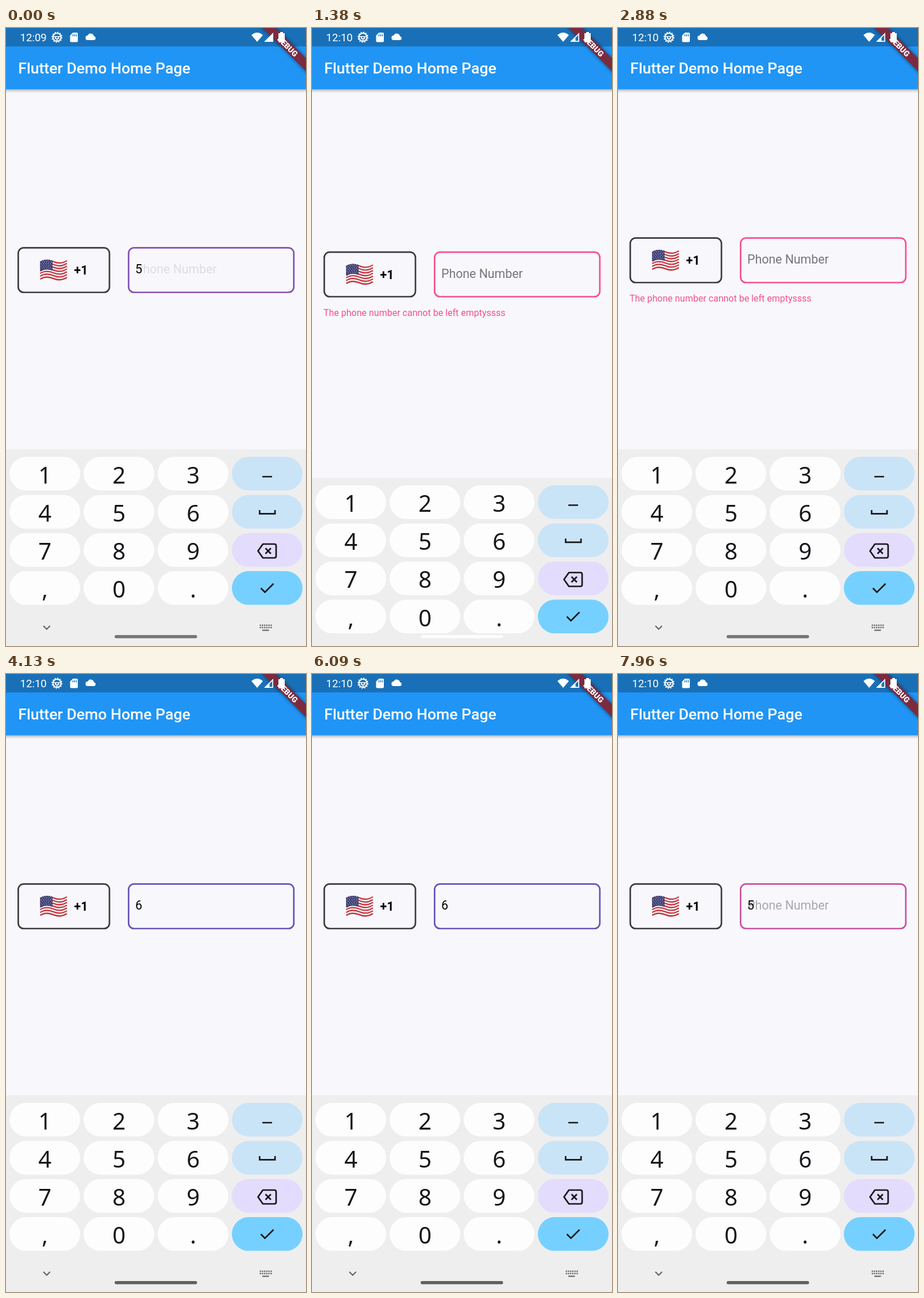
These frames come from a looping animation (522x1073 px, 8 s). An HTML page:

```html
<!DOCTYPE html>
<html lang="en">
<head>
<meta charset="utf-8">
<title>Phone number form</title>
<style>
html, body { margin: 0; width: 100%; height: 100%; overflow: hidden; background: #f8f8fc; }
svg { display: block; width: 522px; height: 1073px; font-family: Roboto, sans-serif; }
.line { fill: none; stroke: #17171b; stroke-width: 2.7; }
.box { fill: none; stroke-width: 2.7; }
.field { font-size: 21.3px; }
.digit { font: 40px "Noto Sans", "Open Sans", sans-serif; text-anchor: middle; fill: #17171b; }
</style>
</head>
<body>
<svg viewBox="0 0 522 1073">
  <defs>
    <linearGradient id="shade" x2="0" y2="1">
      <stop stop-color="#000" stop-opacity=".36"/>
      <stop offset=".4" stop-color="#000" stop-opacity=".13"/>
      <stop offset="1" stop-color="#000" stop-opacity="0"/>
    </linearGradient>
    <filter id="blur" x="-20%" y="-60%" width="140%" height="220%"><feGaussianBlur stdDeviation="3"/></filter>
    <clipPath id="canton"><path d="M59 399h22v40H59z"/></clipPath>
  </defs>
  <rect width="522" height="1073" fill="#f8f8fc"/>

  <!-- App bar -->
  <rect y="106" width="522" height="7" fill="url(#shade)"/>
  <rect width="522" height="106" fill="#2095f5"/>
  <rect width="522" height="32" fill="#1a70b7"/>
  <text x="21.3" y="79.3" font-size="26.6" font-weight="500" fill="#fff">Flutter Demo Home Page</text>

  <!-- Corner banner -->
  <g transform="translate(522 0) rotate(45)">
    <rect x="-60" y="37.2" width="120" height="16" fill="#000" opacity=".5" filter="url(#blur)"/>
    <rect x="-60" y="37.2" width="120" height="16" fill="#7b2b40"/>
    <text y="50" font-size="13.6" font-weight="900" text-anchor="middle" fill="#fff">DEBUG</text>
  </g>

  <!-- Status icons -->
  <g fill="#fff">
    <text id="clock" x="24.5" y="23" font-size="18.6"></text>
    <g fill="none" stroke="#fff">
      <circle cx="88.7" cy="16" r="7" stroke-width="2"/>
      <circle cx="88.7" cy="16" r="8.6" stroke-width="1.8" stroke-dasharray="2.2 2.3"/>
      <path d="M82 15h13.4M86 15v3.5h5.4V15M88.7 18.5V23" stroke-width="1.7"/>
    </g>
    <path d="M116.5 8H123q2 0 2 2v12.500q0 2-2 2h-9.500q-2 0-2-2V13z"/>
    <path d="M116.500 11v3.500m3-3.500v3.500m3-3.500v3.500" stroke="#1a70b7" stroke-width="1.400"/>
    <path d="M142.500 21a4 4 0 0 1-.3-8 5.700 5.700 0 0 1 10.800 1.200 3.500 3.500 0 0 1 .5 6.800z"/>
    <path d="M427 12.300Q437 3.800 447 12.300L437 24z"/>
    <path d="M465 8v16h-16z"/>
    <path id="weak" d="M463.300 12.200v10.100h-4.800v-5.300z" fill="#1a70b7"/>
    <path d="M477 7h5v2h3v14.500q0 1.500-1.500 1.500h-8q-1.500 0-1.500-1.500V9h3z"/>
  </g>

  <!-- Form -->
  <g id="form">
    <rect class="box" x="21.300" y="381.600" width="158.700" height="77.400" rx="9.500" stroke="#3b3a41"/>
    <g id="flag" fill="none"></g>
    <text class="field" x="118.500" y="428" font-weight="600">+1</text>
    <rect id="border" class="box" x="213.300" y="381.600" width="287.500" height="77.400" rx="9.500"/>
    <text id="hint" class="field" x="225" y="426">Phone Number</text>
    <text id="value" class="field" x="225" y="426"></text>
    <text id="error" x="20" y="492" font-size="16" fill="#f2508c">The phone number cannot be left emptyssss</text>
  </g>

  <!-- Keyboard -->
  <g id="keyboard">
    <rect y="731.500" width="522" height="400" fill="#eeeeef"/>
    <g id="keys"></g>
    <path class="line" d="M446 779h17M441.300 837v6.300h26.800V837M443.500 972.500l7 7.200 15-15"/>
    <path class="line" stroke-linejoin="round" d="M447 896h20q3 0 3 3v18q0 3-3 3h-20l-8.500-12zM451.500 903.300l9.400 9.400m0-9.400l-9.400 9.400"/>
    <path d="M65 1038l5.800 5.800 5.800-5.800" fill="none" stroke="#606064" stroke-width="2"/>
    <path d="M441.500 1037h21M441.500 1041h21" stroke="#68686c" stroke-width="2.300" stroke-dasharray="2.300 1.440"/>
    <path d="M446 1045.700h11.500" stroke="#68686c" stroke-width="2.200"/>
  </g>
  <rect id="pill" x="189" y="1054" width="143.500" height="5.500" rx="2.700"/>
</svg>
<script>
const $ = id => document.getElementById(id);

function add(parent, tag, attrs, text = '') {
  const el = document.createElementNS('http://www.w3.org/2000/svg', tag);
  for (const key in attrs) el.setAttribute(key, attrs[key]);
  el.textContent = text;
  parent.append(el);
}

// Waving flag: thirteen stripes, then the star field clipped over the first seven
const flag = $('flag'), pitch = 2.42;
const wave = y => `M59.500 ${y + 3}C67 ${y - 2} 76 ${y - 1} 83 ${y + 2}S98 ${y + 5} 106 ${y}`;
for (let i = 0; i < 13; i++)
  add(flag, 'path', {d: wave(404 + i * pitch), stroke: i % 2 ? '#f3efef' : '#c4343f', 'stroke-width': pitch + .1});
for (let i = 0; i < 7; i++)
  add(flag, 'path', {d: wave(404 + i * pitch), stroke: '#3c3f75', 'stroke-width': pitch + .3, 'clip-path': 'url(#canton)'});
for (let row = 0; row < 6; row++)
  for (let col = 0; col < 5; col++) {
    const x = 61.500 + col * 4 + row % 2 * 1.500;
    add(flag, 'circle', {cx: x, cy: 404.500 + row * 2.800 - 1.800 * Math.sin((x - 59) / 7.500), r: .65, fill: '#d4d4e4'});
  }

const side = ['#cae4f7', '#cae4f7', '#e4dcfc', '#76d0ff'];
['123', '456', '789', ',0.'].forEach((row, r) => {
  for (let c = 0; c < 4; c++) {
    const x = 6 + c * 129, y = 744.500 + r * 66.200;
    add($('keys'), 'rect', {x, y, width: 123, height: 58.500, rx: 29.200, fill: c < 3 ? '#fdfdfd' : side[r]});
    if (c < 3) add($('keys'), 'text', {class: 'digit', x: x + 61.700, y: y + 46}, row[c]);
  }
});

const invalid = {clock: '12:10', value: '', border: '#f84f91', hint: '#77777a', error: true};
const valid = {clock: '12:10', border: '#6852b8', hint: 'none', shift: -17, pill: '#606060'};
const states = [
  {at: 0, clock: '12:09', value: '5', border: '#8551b2', hint: '#dedee1', shift: 0, pill: '#757575'},
  {at: 1080, ...invalid, shift: 7.500, drop: 49.500, pill: '#fdfdfd'},
  {at: 1680, ...invalid, shift: -17, pill: '#757575'},
  {at: 4080, ...valid, value: '6'},
  {at: 6340, ...valid, value: '9'},
  {at: 7580, ...valid, value: '5', border: '#c9509f', hint: '#a9a9ab'},
];

function draw(now) {
  const t = now % 8000;
  const s = states.findLast(state => state.at <= t);
  $('clock').textContent = s.clock;
  $('weak').setAttribute('visibility', s.clock === '12:10' ? 'visible' : 'hidden');
  $('value').textContent = s.value;
  $('border').setAttribute('stroke', s.border);
  $('hint').setAttribute('fill', s.hint);
  $('error').setAttribute('visibility', s.error ? 'visible' : 'hidden');
  $('pill').setAttribute('fill', s.pill);
  $('form').setAttribute('transform', `translate(0 ${s.shift})`);
  $('keyboard').setAttribute('transform', `translate(0 ${s.drop || 0})`);
  requestAnimationFrame(draw);
}
draw(performance.now());
</script>
</body>
</html>
```
